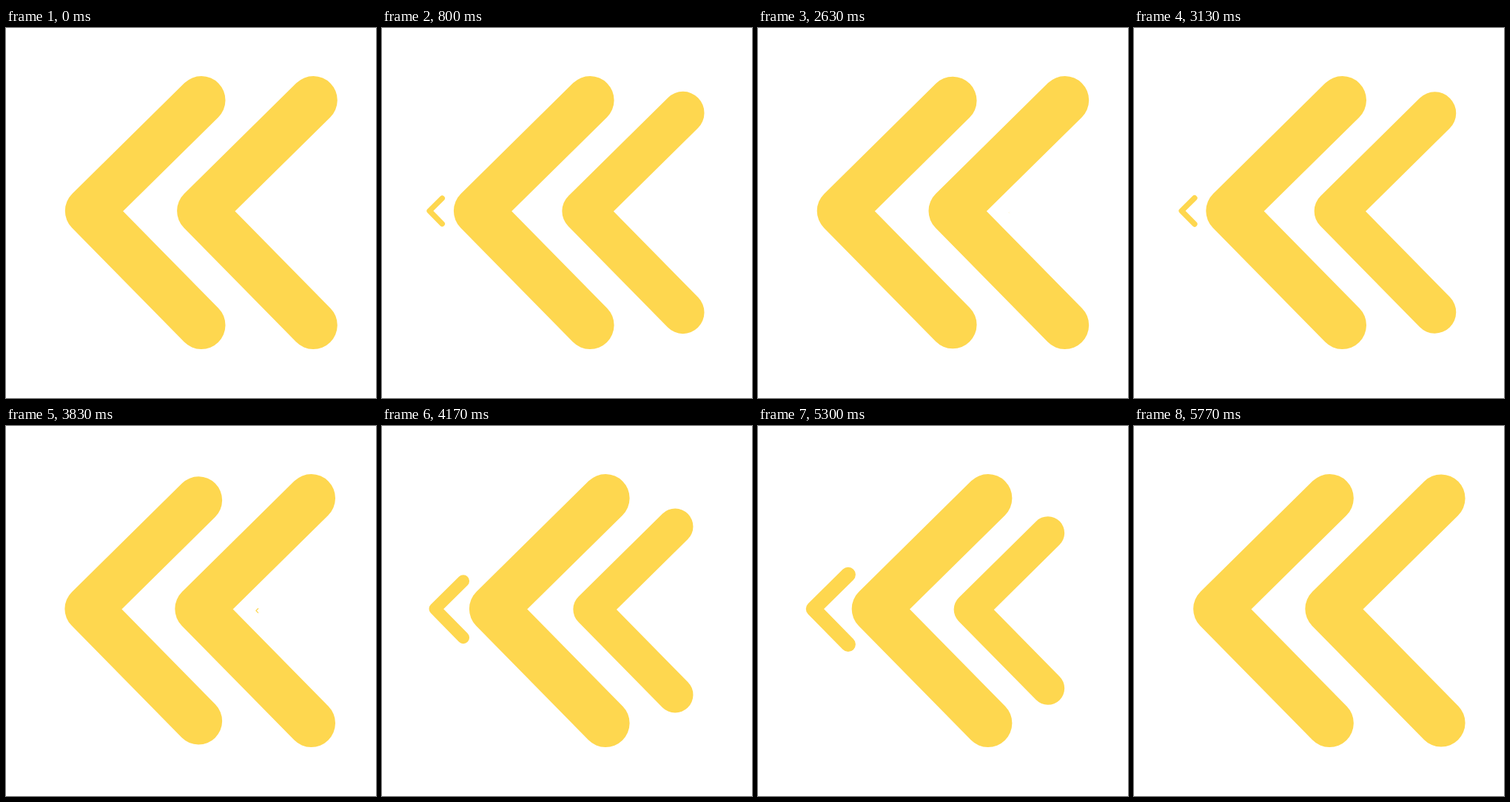
Animation of 500 by 500 pixels, one loop 5810 ms. Source, as an HTML page without scripts:

```html
<!DOCTYPE html>
<html lang="en">
<head>
<meta charset="utf-8">
<title>Chevrons moving left</title>
<style>
  /* Progress of one step to the left: 0 = at rest, 1 = arrived */
  @property --e {
    syntax: "<number>";
    inherits: true;
    initial-value: 0;
  }

  html, body {
    margin: 0;
    height: 100%;
    overflow: hidden;
    background: #fff;
  }

  svg {
    display: block;
    width: 100vw;
    height: 100vh;
    animation: step 5.81s linear infinite;
  }

  use {
    fill: none;
    stroke: #fed74f;
    stroke-width: 65px;
    stroke-linecap: round;
    stroke-linejoin: round;
  }

  /* Shrinks away, then cuts out while still small */
  .leave {
    transform:
      translate(calc(188px - 130px * var(--e)), calc(249.5px - 2.4px * var(--e)))
      scale(calc(1 - var(--e)));
    opacity: clamp(0, (0.92 - var(--e)) * 9999, 1);
  }

  .slide {
    transform: translate(calc(339.3px - 151.3px * var(--e)), 249.5px);
  }

  .enter {
    transform: translate(339.3px, 249.5px) scale(var(--e));
  }

  /* Five rounds of rest and move; the last one ends slightly early */
  @keyframes step {
    0%, 20.081%, 40.162%, 60.242%, 80.322% { --e: 0; }
    4.59%, 24.67%, 44.75%, 64.831% {
      --e: 0;
      animation-timing-function: cubic-bezier(.333, 0, .165, 1);
    }
    84.911% {
      --e: 0;
      animation-timing-function: cubic-bezier(.338, 0, .173, .979);
    }
    20.08%, 40.161%, 60.241%, 80.321%, 100% { --e: 1; }
  }
</style>
</head>
<body>
<svg viewBox="0 0 500 500">
  <defs>
    <path id="chevron" d="M76 -152 L-75.7 -2.3 L76 152"/>
  </defs>
  <use class="leave" href="#chevron"/>
  <use class="slide" href="#chevron"/>
  <use class="enter" href="#chevron"/>
</svg>
</body>
</html>
```
